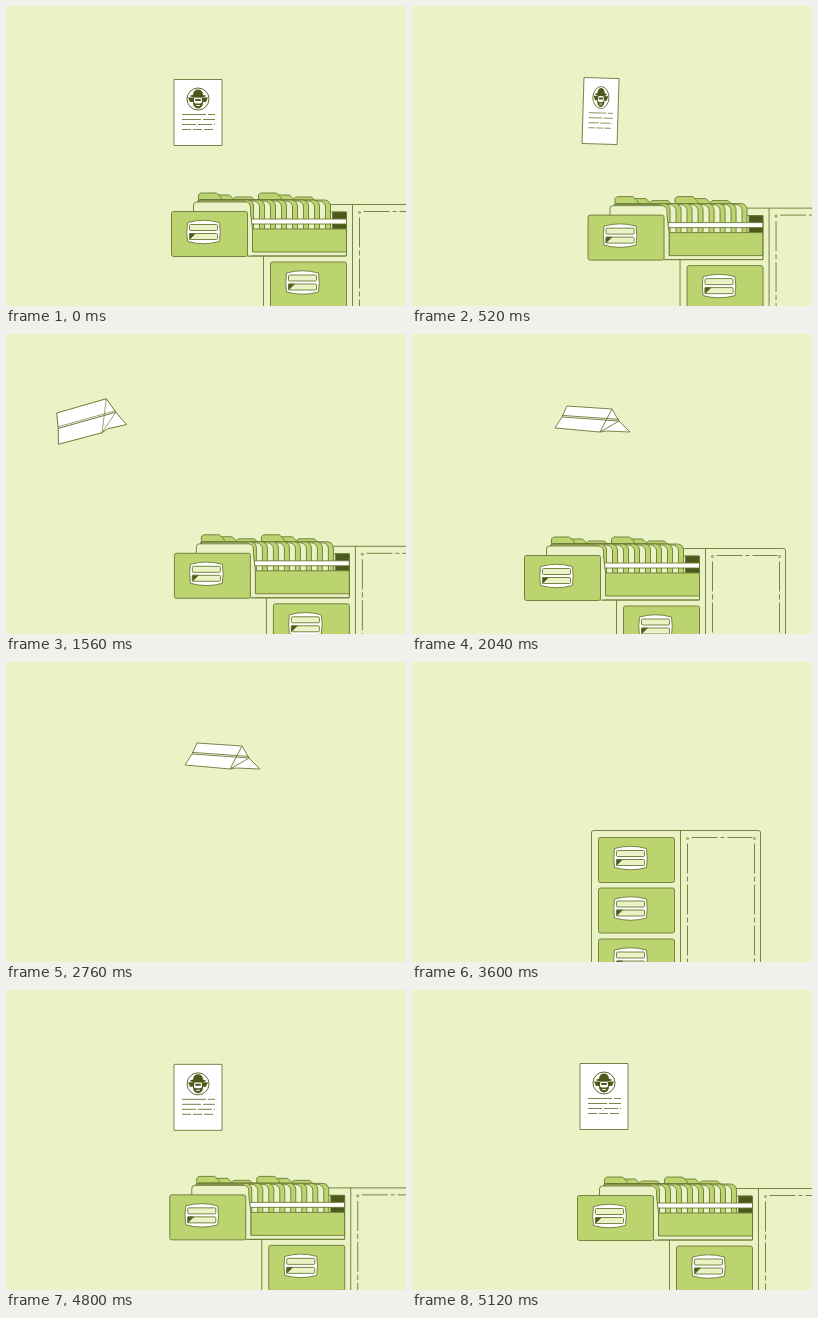
An HTML page with a canvas that plays this animation: 400x300 px, repeating every 5160 ms.

```html
<!DOCTYPE html>
<html lang="en">
<head>
<meta charset="utf-8">
<title>Paper plane</title>
<style>
html, body { margin: 0; width: 100%; height: 100%; overflow: hidden; background: #ebf3c6; }
canvas { display: block; }
</style>
</head>
<body>
<canvas id="stage" width="400" height="300"></canvas>
<script>
const ctx = document.getElementById('stage').getContext('2d');
const LOOP = 5160, STEP = 40;
const LAND = 2740;  // the next cabinet takes over, off stage
const OPEN = 4320;  // its drawer springs open
const POP = 4440;   // a new poster leaves the drawer
const BG = '#ebf3c6', GREEN = '#bcd470', LINE = '#6b7936', DARK = '#4b5a1b', WHITE = '#fff';

// Key points: [time, x, y]
const PAN = [[0, 78, 30], [1100, 101, 40], [2040, 25, 46], [2640, -400, 46]];
const FLIGHT = [[0, 192, 106.5], [560, 188, 105], [820, 136, 112], [1080, 172, 126.5],
  [1560, 82, 86], [1780, 107, 65], [2040, 180, 85], [2760, 216, 94], [3560, 445, 122]];

// Tail top, wing top, nose fold, nose, curl, belly, tail bottom, tail fold
const SHEET = [[-33, -24], [33, -24], [33, 0], [33, 24], [20, 24], [12, 24], [-33, 24], [-33, 0]];
const PLANE = [[-25, -13], [20, -10], [27, 2], [38, 13], [14, 12], [8, 13], [-37, 9], [-30, -2]];

const ramp = (t, a, b) => Math.min(1, Math.max(0, (t - a) / (b - a)));
const smooth = (t, a, b) => { const u = ramp(t, a, b); return u * u * (3 - 2 * u); };
const remain = (t, a, b, power) => (1 - ramp(t, a, b)) ** power;
const mix = (a, b, u) => a + (b - a) * u;

// Monotone cubic through the keys
function track(keys, t) {
  const last = keys.length - 1;
  if (t >= keys[last][0]) return keys[last].slice(1);
  const i = keys.findIndex(k => k[0] > t) - 1;
  const h = keys[i + 1][0] - keys[i][0], u = (t - keys[i][0]) / h;
  return [1, 2].map(c => {
    const slope = j => (keys[j + 1][c] - keys[j][c]) / (keys[j + 1][0] - keys[j][0]);
    const tangent = j => {
      if (j < 1 || j >= last) return 0;
      const a = slope(j - 1), b = slope(j);
      return a * b > 0 ? 2 * a * b / (a + b) : 0;
    };
    return mix(keys[i][c], keys[i + 1][c], u * u * (3 - 2 * u)) +
      h * u * (1 - u) * ((1 - u) * tangent(i) - u * tangent(i + 1));
  });
}

function paint(fill, stroke = LINE) {
  if (fill) { ctx.fillStyle = fill; ctx.fill(); }
  if (stroke) { ctx.strokeStyle = stroke; ctx.stroke(); }
}
function box(x, y, w, h, r, fill, stroke) {
  ctx.beginPath();
  ctx.roundRect(x, y, w, h, r);
  paint(fill, stroke);
}
function poly(points, fill, stroke) {
  ctx.beginPath();
  points.forEach(p => ctx.lineTo(...p));
  if (fill) ctx.closePath();
  paint(fill, stroke);
}
function oval(x, y, rx, ry, fill, stroke) {
  ctx.beginPath();
  ctx.ellipse(x, y, rx, ry, 0, 0, 7);
  paint(fill, stroke);
}
function dashes(x1, y1, x2, y2, pattern, color) {
  ctx.setLineDash(pattern);
  poly([[x1, y1], [x2, y2]], null, color);
  ctx.setLineDash([]);
}

function front(x, y) {
  box(x, y, 76, 45, 2, GREEN);
  ctx.save();
  ctx.translate(x + 32, y + 20.5);
  ctx.beginPath();
  ctx.moveTo(-16, -9.5);
  ctx.quadraticCurveTo(0, -14, 16, -9.5);
  ctx.quadraticCurveTo(17.5, 0, 16, 9.5);
  ctx.quadraticCurveTo(0, 14, -16, 9.5);
  ctx.quadraticCurveTo(-17.5, 0, -16, -9.5);
  paint(WHITE);
  for (const top of [-7.5, 1.5]) box(-14, top, 28, 6, 1, BG);
  poly([[-14, 1.5], [-8, 1.5], [-14, 7.5]], DARK);
  ctx.restore();
}

function tab(x, y) {
  poly([[x, y + 9], [x, y + 2], [x + 2, y], [x + 18, y], [x + 22, y + 4], [x + 25, y + 9]], GREEN);
}

function folders(lean) {
  ctx.save();
  ctx.transform(1, 0, -lean, 1, 18 * lean, 0);
  for (const x of [27, 87]) {
    tab(x + 35, -15);
    tab(x + 13, -17);
    tab(x, -19);
  }
  for (let edge = 159; edge > 80; edge -= 11) {
    box(26, -12, edge - 26, 30, [3, 6, 0, 0], GREEN);
    box(26, -11, edge - 31, 29, [3, 6, 0, 0], BG);
  }
  ctx.restore();
  box(22, -10, 57, 30, [3, 5, 0, 0], BG);
}

function openDrawer(x, y, lean) {
  ctx.save();
  ctx.beginPath();
  ctx.rect(0, 0, 262.5, 400);
  ctx.clip();
  ctx.translate(x, y);
  box(76, 0, 99, 44, 1, BG);
  box(161, 0, 14, 17, 0, DARK);
  folders(lean);
  box(80, 7, 95, 5, 0, WHITE);
  box(81, 17, 94, 23, 0, GREEN);
  poly([[76, 0], [79, 0], [81, 17], [81, 44], [76, 44]], BG, null);
  poly([[79, 0], [81, 17], [81, 40]]);
  poly([[76, 44], [175, 44], [175, 0]]);
  ctx.restore();
}

function cabinet(x, y, pull, lean) {
  ctx.save();
  ctx.translate(x + .5, y + .5);
  box(179, 168, 169, 220, 2, BG);
  poly([[268, 168], [268, 388]]);
  dashes(279, 175, 340, 175, [26, 3, 4, 3]);
  for (const side of [275, 342]) {
    dashes(side, 181, side, 388, [30, 3, 5, 3]);
    oval(side, 176, 1, 1, BG);
  }
  for (let top = 226; top < 300; top += 51) front(186, top - .5);
  if (pull > 1) openDrawer(186 - pull, 175.5, lean);
  front(186 - pull, 175);
  ctx.restore();
}

function poster() {
  oval(0, -13.5, 11, 11, WHITE, DARK);
  poly([[-10, -15], [10, -15], [8, -10.5], [-8, -10.5]], DARK, null);
  oval(0, -10, 5, 6, DARK, null);
  box(-4, -15, 8, 6, 2, WHITE, null);
  box(-3, -13.5, 6, 2, 1, DARK, null);
  box(-2, -7.5, 4, 1, .5, WHITE, null);
  box(-5, -23, 10, 7, [5, 5, 0, 0], DARK, null);
  oval(0, -16.5, 8, 1.5, DARK, null);
  for (let i = 0; i < 4; i++) dashes(-16, 2 + 5 * i, 17, 2 + 5 * i, [24 - 5 * i, 2], LINE);
}

function flyingSheet(t) {
  const turn = Math.cos(Math.PI * smooth(t, 380, 820));
  const width = Math.max(.06, Math.abs(turn));
  const curl = 4 * smooth(t, 800, 1080), fold = smooth(t, 1160, 1800);
  const points = SHEET.map(([x, y], i) => [
    mix(i === 3 ? x - curl : x, PLANE[i][0], fold),
    mix(i === 4 ? y - curl : y, PLANE[i][1], fold) * width
  ]);
  const [, top, noseFold, , , belly, , tailFold] = points;
  ctx.translate(...track(FLIGHT, t));
  ctx.rotate(Math.PI / 2 * (smooth(t, 385, 2040) - 1));
  poly(points, WHITE);
  if (turn < 0) {
    poly([tailFold, noseFold]);
    ctx.globalAlpha = fold;
    poly([tailFold, noseFold].map(([x, y]) => [x, y - 1.6]));
    poly([top, belly, noseFold]);
  } else {
    ctx.rotate(Math.PI / 2);
    ctx.scale(width, 1);
    poster();
  }
}

function risingSheet(t) {
  const size = mix(.5, 1, ramp(t, POP, 4640));
  ctx.translate(192, 106.5 + 140 * remain(t, POP, 4880, 3));
  ctx.scale(size, size);
  box(-24, -33, 48, 66, 0, WHITE);
  poster();
}

function sheet(t) {
  ctx.save();
  if (t < 3560) flyingSheet(t);
  else if (t > POP) risingSheet(t);
  ctx.restore();
}

function scene(t) {
  if (t < LAND) {
    cabinet(...track(PAN, t), 99, 0);
    return;
  }
  const pan = 78 * (1 - remain(t, OPEN, LOOP, 4.5));
  const shake = t >= 4120 && t < 4200 ? 1.5 : 0;
  const x = 300 * remain(t, 2820, 3600, 2) + pan + shake;
  const pull = 99 * (1 - remain(t, OPEN, 4480, 2));
  cabinet(x, pan * .385, pull, .4 * (1 - smooth(t, 4480, 4760)));
}

function draw(now) {
  const t = Math.floor(now % LOOP / STEP) * STEP;
  ctx.fillStyle = BG;
  ctx.fillRect(0, 0, 400, 300);
  ctx.lineWidth = .9;
  ctx.lineJoin = 'round';
  // A rising poster starts behind the folders
  const layers = t > POP ? [sheet, scene] : [scene, sheet];
  layers.forEach(layer => layer(t));
}

const start = performance.now();
function tick() {
  draw(performance.now() - start);
  requestAnimationFrame(tick);
}
tick();
</script>
</body>
</html>
```
